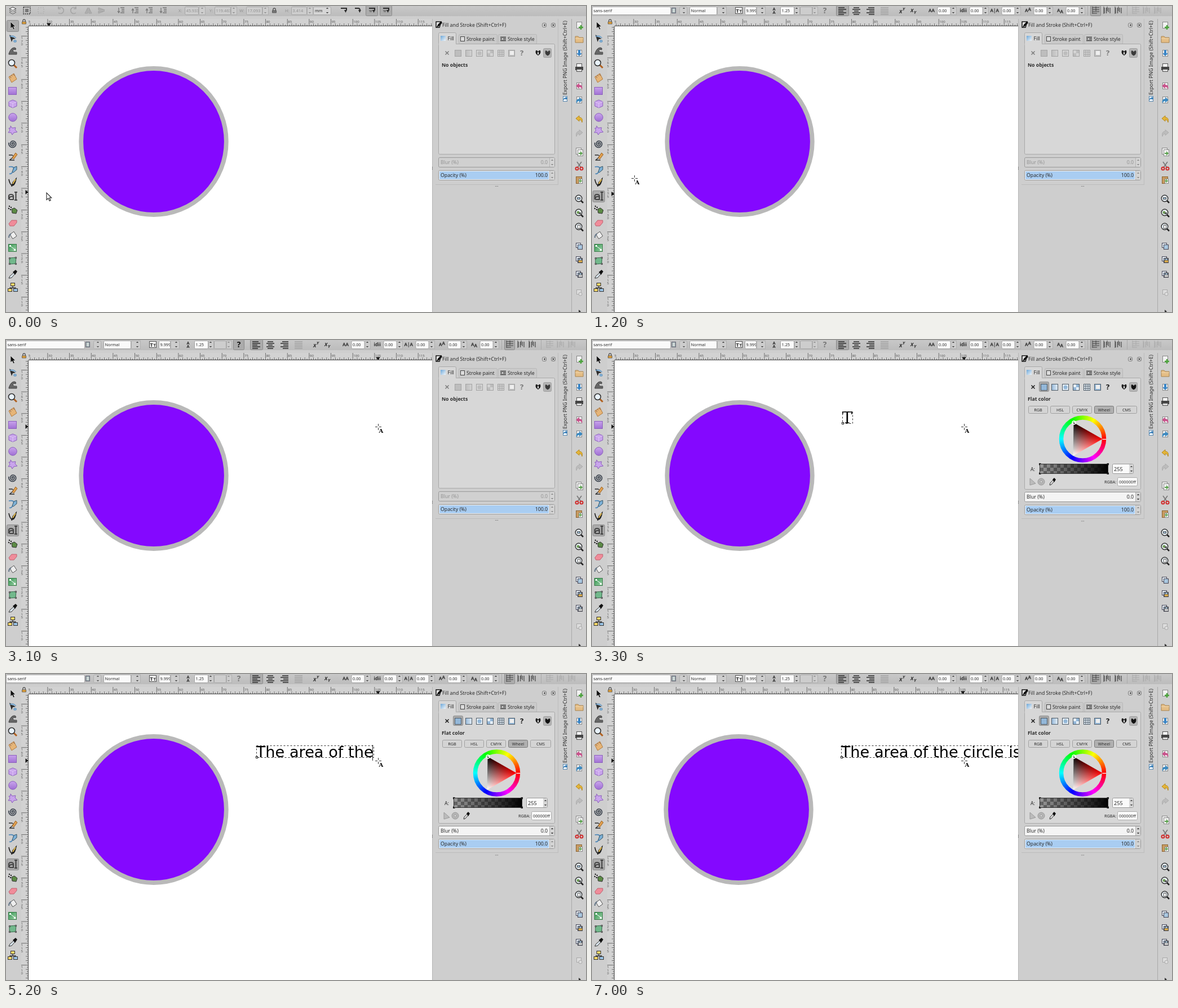
An HTML page with a canvas for the animation above (8 s loop, 1029x544 px).

```html
<!DOCTYPE html>
<html lang="en">
<head>
<meta charset="utf-8">
<title>Typing text beside a circle</title>
<style>
html, body { margin: 0; width: 100%; height: 100%; overflow: hidden; background: #cecece; }
canvas { display: block; }
</style>
</head>
<body>
<canvas id="stage" width="1029" height="544"></canvas>
<script>
const c = document.getElementById('stage').getContext('2d');
const LOOP = 8000, BG = '#cecece', INK = '#2b2b2b', FADED = '#a3a3a3';
const UI = '"Noto Sans", sans-serif', UNIT = 7.733;
const SENTENCE = 'The area of the circle is';

// [time, characters typed]
const TYPED = [[0, 0], [3300, 1], [3500, 2], [3600, 3], [3700, 4], [3800, 5], [3900, 6], [4000, 7], [4100, 8],
  [4300, 9], [4700, 10], [4800, 11], [4900, 12], [5100, 14], [5200, 15], [5400, 16], [5700, 18], [5800, 19],
  [6200, 20], [6300, 21], [6400, 22], [6600, 23], [7000, 25]];
// [time, x, y]
const POINTER = [[0, 72, 332], [500, 10, 334], [1100, 10, 334], [1200, 75, 306], [1600, 444, 145], [1700, 444, 145],
  [1900, 444, 148], [2200, 444, 148], [2300, 575, 152], [2400, 660, 154], [LOOP, 660, 154]];

function pointerAt(t) {
  t = Math.floor(t / 100) * 100;
  const i = Math.max(1, POINTER.findIndex(p => p[0] >= t));
  const [t0, x0, y0] = POINTER[i - 1], [t1, x1, y1] = POINTER[i];
  const k = (t - t0) / (t1 - t0);
  return [x0 + (x1 - x0) * k, y0 + (y1 - y0) * k];
}

function rect(x, y, w, h, fill, stroke) {
  if (fill) { c.fillStyle = fill; c.fillRect(x, y, w, h); }
  if (stroke) { c.lineWidth = 1; c.strokeStyle = stroke; c.strokeRect(x + .5, y + .5, w - 1, h - 1); }
}
function box(x, y, w, h, fill, stroke) {
  c.beginPath(); c.roundRect(x + .5, y + .5, w - 1, h - 1, 2);
  c.fillStyle = fill; c.fill();
  c.lineWidth = 1; c.strokeStyle = stroke; c.stroke();
}
function text(s, x, y, { size = 8.75, color = INK, align = 'left', weight = 400, family = UI } = {}) {
  c.font = `${weight} ${size}px ${family}`;
  c.textAlign = align; c.fillStyle = color; c.fillText(s, x, y);
}
function icon(x, y, d, fill, stroke, width = 1) {
  c.save(); c.translate(x, y);
  const p = new Path2D(d);
  if (fill) { c.fillStyle = fill; c.fill(p); }
  if (stroke) { c.lineWidth = width; c.strokeStyle = stroke; c.stroke(p); }
  c.restore();
}
function disc(x, y, r, fill, stroke, width = 1) {
  c.beginPath(); c.arc(x, y, r, 0, 7);
  if (fill) { c.fillStyle = fill; c.fill(); }
  if (stroke) { c.lineWidth = width; c.strokeStyle = stroke; c.stroke(); }
}
function gradient(x0, y0, x1, y1, ...colors) {
  const g = c.createLinearGradient(x0, y0, x1, y1);
  colors.forEach((color, i) => g.addColorStop(i / (colors.length - 1), color));
  return g;
}
const spinner = (x, y, color = '#555') => icon(x, y, 'M-2.2-3 0-5.2 2.2-3ZM-2.2 3 0 5.2 2.2 3Z', color);
const small = (s, x, y, more) => text(s, x, y, { size: 7.3, ...more });
const pressed = (x, y, w, h) => box(x, y, w, h, '#ababab', '#8a8a8a');

function entry(label, x, w, off, spinX) {
  box(x, 1, w, 15, off ? '#cdcdcd' : '#fafafa', '#a5a5a5');
  c.save();
  c.beginPath(); c.rect(x, 0, w - 1, 17); c.clip();
  small(label, x + 2.5, 11, { color: off ? '#909090' : INK });
  c.restore();
  if (spinX) { rect(x + w, 1, spinX - x - w + 6, 15, '#cdcdcd', '#b0b0b0'); spinner(spinX, 8, off ? '#909090' : '#444'); }
}

function selectBar() {
  icon(12, 8, 'M-6-3 0-6 6-3 0 0ZM-6 0 0 3 6 0M-6 3 0 6 6 3', '#eee', '#444');
  c.setLineDash([2, 1.5]); icon(37, 8, 'M-6-6H6V6H-6Z', null, INK, 1.3); c.setLineDash([]);
  icon(37, 8, 'M-3-3H3V3H-3Z', '#777');
  c.setLineDash([2, 2]); icon(62, 8, 'M-5-5H5V5H-5Z', null, '#aaa'); c.setLineDash([]);
  icon(97, 8, 'M-4-4A5.5 5.5 0 1 1-4 4M-4-7V-3H0', null, '#a5a5a5', 1.7);
  icon(120, 8, 'M4-4A5.5 5.5 0 1 0 4 4M4-7V-3H0', null, '#a5a5a5', 1.7);
  icon(146, 8, 'M-6 5-1-5V5ZM6 5 1-5V5Z', '#b0b0b0', '#a0a0a0');
  icon(170, 8, 'M-6-5 5-1H-6ZM-6 5 5 1H-6Z', '#b0b0b0', '#a0a0a0');
  [204, 229, 254, 279].forEach((x, i) => {
    icon(x, 8, 'M-1-5H6M1-2H6M1 1H6M-1 4H6', null, '#777', 1.5);
    icon(x, 8, i % 3 ? 'M-4 5V-2M-6 0-4-3-2 0' : 'M-4-5V3M-6 1-4 4-2 1', null, '#777', 1.3);
  });
  [['X:', 306, 317, 25, '45.933', 348], ['Y:', 361, 370, 29, '119.463', 404], ['W:', 414, 426, 29, '17.093', 460],
    ['H:', 495, 506, 28, '3.414', 539]].forEach(([label, x, left, w, value, spin]) => {
    small(label, x, 11, { color: '#909090' });
    entry(value, left, w, true, spin);
  });
  padlock(476, 8, '#777');
  box(545, 1, 32, 15, '#d6d6d6', '#aaa'); small('mm', 548, 11); spinner(570, 8, '#444');
  pressed(638, -2, 22, 20); pressed(663, -2, 22, 20);
  [599, 624, 649, 674].forEach((x, i) => {
    icon(x, 6, i === 1 ? 'M-5-2H1Q4-2 4 2' : 'M-5-2H5V2', null, INK, 2);
    icon(x, 9, 'M1-2H6L3.5 3Z', INK);
    if (i > 1) icon(x, 7, 'M-5 1H2M-4 3H0', null, '#555');
  });
}

function textBar(helpHover) {
  entry('sans-serif', 0, 140);
  rect(141, 3, 8, 10, '#9aa', '#667'); icon(145, 8, 'M-2-2H2M-2 0H2M-2 2H2', null, '#fff');
  box(155, 1, 14, 15, '#cdcdcd', '#b0b0b0'); spinner(163, 8);
  entry('Normal', 173, 49, false, 233);
  rect(254, 2, 13, 12, '#f0f0f0', '#555');
  text('T', 255.5, 12, { size: 9, weight: 800 }); small('T', 261.5, 12, { weight: 800 });
  entry('9.999', 271, 21, false, 302);
  for (const y of [7.5, 14]) small('A', 323, y, { weight: 800, align: 'center' });
  entry('1.25', 334, 25, false, 363);
  entry('', 369, 22, true, 395);
  if (helpHover) pressed(403, -2, 20, 20);
  text('?', 413, 13, { size: 14, weight: 800, align: 'center', color: helpHover ? '#111' : '#777' });
  pressed(433, -2, 23, 20);
  ['M-7-5H4M-7-2H7M-7 1H2M-7 4H7M-7 7H3', 'M-5-5H5M-7-2H7M-4 1H4M-7 4H7M-5 7H5', 'M-4-5H7M-7-2H7M-2 1H7M-7 4H7M-3 7H7',
    'M-7-5H7M-7-2H7M-7 1H7M-7 4H7M-7 7H7'].forEach((d, i) => icon(444 + i * 25, 8, d, null, i === 3 ? FADED : INK, 1.5));
  const script = { weight: 'italic 800' };
  text('X', 545, 13, script); small('Y', 551, 8, script);
  text('X', 565, 11, script); small('Y', 571, 14, script);
  ['AA', 'idii', 'A|A', 'AA', 'AA'].forEach((label, i) => {
    const x = 613 + i * 57, last = label.slice(-1), raise = [0, 0, 0, -2, 2][i];
    text(last, x - 5, 11 + raise, { weight: 800, size: 8, align: 'right' });
    const lastWidth = c.measureText(last).width;
    text(label.slice(0, -1), x - 5 - lastWidth, 11, { weight: 800, size: 8, align: 'right' });
    entry('0.00', x - .5, 24, false, x + 28);
  });
  rect(879, 0, 1, 17, '#aaa'); rect(949, 0, 1, 17, '#aaa');
  pressed(884, -2, 19, 20);
  [894, 914, 934, 965, 984, 1004].forEach((x, i) => {
    const color = i < 3 ? '#444' : '#aaa';
    icon(x, 8, i % 3 ? 'M-5-5V5M-1.5-5V5M2-5V3M5-5V5' : 'M-6-5H6M-6-1.5H6M-6 2H6M-6 5H2', null, color, 1.2);
    icon(x, 8, 'M-6-7V6M0-7V1', null, color);
  });
}

function padlock(x, y, color) {
  icon(x, y, 'M-2.2 0V-2A2.2 2.2 0 0 1 2.2-2V0', null, '#444', 1.2);
  icon(x, y, 'M-3.5 0H3.5V4H-3.5Z', color, '#444', .7);
}

function toolbox(textTool, hover) {
  if (hover) box(1, 328, 22, 21, '#bdbdbd', '#a0a0a0');
  pressed(1, textTool ? 328 : 25, 22, 21);
  const purple = y => gradient(0, y - 7, 0, y + 7, '#c9a4ec', '#a070d4');
  const edge = '#8b5fbd', blue = '#4b86b8';
  icon(8, 28, 'M0 0V12L3 9.5 5 14 7.3 13 5.3 8.7H9Z', '#111', '#eee', .7);
  icon(12, 57, 'M-6-6 5 1 0 2-2 7Z', INK); icon(12, 57, 'M-6-3Q2-6 6 0M2 4H6V7H2Z', '#9cc4e4', blue);
  icon(12, 80, 'M-7 5Q-4-5 2-6Q7-6 5-2Q1-4 0 0Q2 3 7 2V6H-7Z', '#666', '#444');
  icon(12, 103, 'M2 2 7 7', null, '#b06020', 3); disc(10, 101, 5.5, '#e8f2fa', INK, 1.5);
  icon(12, 128, 'M-7-2 2-8 7 2-2 8Z', '#e6b578', '#b27a3c'); icon(12, 128, 'M-5-3-3 0M-2-5-1-3M1-7 3-4', null, '#865');
  rect(4, 144, 15, 14, purple(151), edge);
  icon(12, 174, 'M-7-4 0-7 7-4V4L0 7-7 4Z', purple(174), edge); icon(12, 174, 'M-7-4 0-1 7-4M0-1V7', null, '#e0c8f5');
  disc(12, 198, 7.3, purple(198), edge);
  icon(12, 221, 'M-4-8-1-4 5-5 4-1 8 3 2 4-1 8-3 4-8 4-5 0-7-4-4-4Z', purple(221), edge);
  c.beginPath();
  for (let a = 0; a < 16; a += .2) c.lineTo(12 + a * .45 * Math.cos(a), 245 + a * .45 * Math.sin(a));
  c.strokeStyle = '#444b55'; c.lineWidth = 1.8; c.stroke();
  icon(12, 268, 'M-7-3H-1Q3-1-2 3T-5 6H3', null, INK, 1.3); icon(12, 268, 'M-1 2 5-7 8-4 2 4Z', '#e0a050', '#9a6020');
  icon(12, 291, 'M-7-5Q4-7 1 1T-6 7', null, blue, 1.7); icon(12, 291, 'M-1 4 2-4 7-6 7 0 1 5Z', '#7db1d8', '#356');
  icon(12, 314, 'M-7-6Q-5 5 0 5Q4 4 6-7L0 0-2 7', '#222', '#222', 1.6); icon(12, 314, 'M0 2 5-6', null, '#e5bc50', 2);
  icon(12, 338, 'M3-7H8M5.5-7V7M3 7H8M-7 6V0Q-7-3-3-3T1 0V6H-4Q-7 6-6 3T1 1', null, '#444', 2.1);
  icon(12, 362, 'M-2-1 3-3 8 1 6 7-1 6Z', '#5b8a45', '#333');
  [[6, 356], [9, 358], [5, 360], [8, 362]].forEach(([x, y]) => disc(x, y, 1.2, '#222'));
  icon(12, 385, 'M-7 2-2-4H7V0L2 6H-5Z', '#f08c9a', '#c0606e');
  icon(12, 407, 'M-5-1 2-6 7 2 0 7Z', '#eee', '#555'); icon(12, 407, 'M-7 5Q-7 0-3-2', null, '#678', 2);
  rect(4, 423, 15, 14, gradient(4, 423, 19, 437, '#2c9148', '#a5d6b0'), '#397a48');
  icon(12, 430, 'M-4-3 4 3', null, '#fff'); rect(6, 425, 3, 3, '#fff'); rect(14, 432, 3, 3, '#fff');
  icon(12, 453, 'M-6-5 6-6 5 5-6 6Z', '#72b88c', '#356b4a');
  [[5, 447], [16, 446], [5, 457], [16, 457]].forEach(([x, y]) => rect(x, y, 3, 3, '#eee', '#444'));
  icon(12, 477, 'M-7 7-5 3 2-3 4-1-2 6Z', '#dce7ef', '#333'); icon(12, 477, 'M0-4 5-8 8-5 4 1Z', '#111');
  icon(12, 500, 'M0-4V1M-5 4V1H5V4', null, '#333', 1.3);
  rect(8, 492, 8, 6, '#f4d768', '#333'); rect(3, 502, 8, 6, '#f4d768', '#333'); rect(13, 502, 8, 6, '#9bc4e6', '#333');
}

function rulers(shift, [mx, my]) {
  const label = { size: 6, color: '#555' };
  rect(27, 23, 729, 13, '#d2d2d2'); rect(27, 36, 13, 508, '#d2d2d2');
  c.save();
  c.beginPath(); c.rect(40, 23, 716, 13); c.rect(27, 36, 13, 508); c.clip();
  for (let i = 0; i < 190; i++) {
    const x = 73.5 + shift + (i / 2 - 5) * UNIT;
    const major = i % 10 === 0, len = major ? 13 : i % 2 ? 3 : 5;
    rect(x, 36 - len, .8, len, '#555');
    if (major) text(25 + i / 2, x + 1.5, 29.5, label);
  }
  for (let i = 0; i < 150; i++) {
    const y = 517 - (i / 2 - 5) * UNIT;
    const major = i % 10 === 0, len = major ? 13 : i % 2 ? 3 : 5;
    rect(40 - len, y, len, .8, '#555');
    if (major) [...String(105 + i / 2)].forEach((d, k) => text(d, 26.5, y + 6 + k * 5.5, label));
  }
  icon(mx + shift, 33, 'M-4-2.5H4L0 2.5Z', '#111');
  icon(37, my, 'M-2.5-4V4L2.5 0Z', '#111');
  c.restore();
  rect(40, 35, 716, 1, '#444'); rect(39, 36, 1, 508, '#444');
  padlock(32, 28, '#e2a13a');
}

function colorWheel(x, y) {
  const ring = c.createConicGradient(0, x, y);
  ['#f00', '#f0f', '#00f', '#0ff', '#0f0', '#ff0', '#f00'].forEach((color, i) => ring.addColorStop(i / 6, color));
  disc(x, y, 38, null, ring, 7.5);
  const triangle = 'M35 0L-16-29L-17 30Z';
  icon(x, y, triangle, '#000');
  c.globalCompositeOperation = 'lighter';
  icon(x, y, triangle, gradient(-16.5, 0, 35, 0, '#000', '#f00'));
  icon(x, y, triangle, gradient(8.5, -14.5, -17, 30, '#000', '#fff'));
  c.globalCompositeOperation = 'source-over';
  icon(x, y, 'M35 .5H42', null, '#fff', 1.3);
  disc(x - 15.5, y - 29, 3, null, '#fff', 1.3);
}

function fillControls() {
  ['RGB', 'HSL', 'CMYK', 'Wheel', 'CMS'].forEach((name, i) => {
    const x = 774 + i * 39, on = name === 'Wheel', w = i === 4 ? 37 : 35;
    box(x, 117, w, 14, on ? '#b0b0b0' : '#d4d4d4', on ? '#777' : '#a0a0a0');
    small(name, x + w / 2, 127, { align: 'center' });
  });
  colorWheel(870.5, 176);
  text('A:', 778, 233);
  for (let i = 0; i < 20; i++) for (let j = 0; j < 3; j++)
    rect(795 + i * 6, 221 + j * 6, 6, j === 2 ? 5 : 6, (i + j) % 2 ? '#666' : '#999');
  rect(794, 220, 122, 18, gradient(794, 0, 916, 0, 'rgba(0,0,0,0)', '#000'), '#333');
  icon(794, 220, 'M-1-1H3L-1 3ZM123-1H119L123 3ZM-1 19H3L-1 15ZM123 19H119L123 15Z', '#222');
  box(923, 220, 38, 18, '#fafafa', '#999'); rect(953, 221, 7, 16, '#d6d6d6');
  text('255', 926, 233, { size: 9.2 }); spinner(957, 229, '#444');
  icon(781, 252, 'M-4-6 6 3-4 6Z', '#bbb', '#999');
  disc(797, 252, 6, '#b5b5b5', '#999'); disc(797, 252, 2, '#ddd', '#999');
  icon(817, 252, 'M-5 6-4 2 1-3 3-1-2 5Z', '#ddd', '#333'); icon(817, 252, 'M0-4 3-7 6-4 3 1Z', '#111');
  small('RGBA:', 909, 255); box(932, 244, 36, 16, '#fafafa', '#aaa'); small('000000ff', 935, 255);
}

function sliderRow(label, value, y, on, selected) {
  box(767, y, 207, 18, on ? '#f4f4f4' : '#d0d0d0', '#999');
  if (selected) rect(769, y + 2, 194, 14, '#a9cdf2');
  rect(964, y + 1, 9, 16, '#d4d4d4'); rect(964, y + 1, 1, 16, '#b4b4b4');
  const color = on ? INK : '#949494';
  text(label, 771, y + 12.3, { color }); text(value, 961, y + 12.3, { color, align: 'right' });
  spinner(969, y + 9, on && !selected ? '#333' : '#888');
}

function panel(active) {
  rect(756, 18, 273, 526, BG); rect(756, 23, 1, 521, '#b5b5b5');
  rect(762, 317, 217, 1, '#bcbcbc'); rect(979, 23, 1, 295, '#bcbcbc');
  icon(768, 33, 'M-5-5H4L1 5H-5Z', '#f4f4f4', '#111', 1.5); icon(768, 33, 'M-4 5-2 0 4-6 6-3 0 3Z', '#111');
  text('Fill and Stroke (Shift+Ctrl+F)', 774, 36.7);
  [955, 971].forEach(x => box(x - 4, 30, 8, 8, '#d6d6d6', '#777'));
  icon(955, 34, 'M-1.5 0 1.5-2V2Z', '#333'); icon(971, 34, 'M-2-2 2 2M2-2-2 2', null, '#333');

  const bottom = active ? 266 : 264;
  box(803, 50, 69, 18, '#cacaca', '#b8b8b8'); box(873, 50, 69, 18, '#cacaca', '#b8b8b8');
  box(767, 67, 207, bottom - 67, '#d7d7d7', '#a8a8a8');
  box(767, 47, 32, 22, '#d7d7d7', '#a8a8a8'); rect(768, 66, 30, 4, '#d7d7d7');
  rect(771, 53, 9, 9, gradient(771, 53, 780, 62, '#6fa8d8', '#eef5fb'));
  text('Fill', 783.5, 60.7);
  rect(806, 54, 8, 9, '#ddd', '#444'); text('Stroke paint', 817, 61.7);
  icon(882, 58.5, 'M-5-3H5M-5 0H-2M0 0H5M-5 3H5', null, '#333', 1.4); text('Stroke style', 890, 61.7);

  const edge = active ? '#4d5a66' : FADED, ink = active ? '#111' : '#777';
  icon(782.5, 83.5, 'M-3-3 3 3M3-3-3 3', null, ink, 1.4);
  if (active) pressed(793, 74, 18, 18);
  const flat = active ? '#93b7d8' : '#bdbdbd', pale = active ? '#e6eff7' : '#d3d3d3';
  [802, 821, 840, 859, 878, 897].forEach((x, i) => {
    rect(x - 6, 78, 12, 12, [flat, gradient(x - 6, 0, x + 6, 0, flat, pale), pale, pale, pale, flat][i], edge);
    if (i === 2) disc(x, 84, 3.5, flat);
    if (i === 3) { rect(x, 79, 5, 5, flat); rect(x - 5, 84, 5, 5, flat); }
    if (i === 4) icon(x, 84, 'M-5-2H5M-5 2H5M-2-5V5M2-5V5', null, edge);
    if (i === 5) rect(x - 3, 80, 7, 7, '#eee');
  });
  text('?', 915, 88, { size: 13, weight: 800, align: 'center', color: ink });
  box(953, 75, 15, 17, '#b4b4b4', '#a0a0a0');
  const shield = 'M-4-4Q-2-5 0-2Q2-5 4-4Q6 2 0 5Q-6 2-4-4Z';
  icon(944, 83, shield, '#222'); icon(944, 83, 'M-1-1H1V3H-1Z', '#e4e4e4'); icon(961, 83.5, shield, active ? '#111' : '#3a3a3a');
  text(active ? 'Flat color' : 'No objects', 773, 107.7, { weight: 700 });
  if (active) fillControls();

  const drop = active ? 1.5 : 0;
  sliderRow('Blur (%)', '0.0', 269 + Math.floor(drop), active, false);
  sliderRow('Opacity (%)', '100.0', 292 + Math.floor(drop), true, true);
  for (const x of [868, 870, 872]) rect(x, 320 + drop, 1, 1, '#666');
  for (const y of [286, 288, 290]) rect(756, y, 1, 1, '#555');

  c.save(); c.translate(995, 158); c.rotate(-Math.PI / 2);
  text('Export PNG Image (Shift+Ctrl+E)', 0, 0); c.restore();
  rect(988, 160, 8, 10, '#eef5fb', '#5a87ad'); icon(991, 164, 'M-2 3Q-2-1 2-1V-3L5 0 2 3V1Q0 1-2 3Z', '#2e78b5');
}

function commandBar() {
  rect(1003, 23, 1, 521, '#a9a9a9');
  const page = (x, y) => rect(x - 5, y - 6, 10, 12, '#f2f2f2', '#888');
  const x = 1017;
  page(x, 34); icon(x + 3, 38, 'M-4 0H4M0-4V4', null, '#4ca63c', 2.5);
  icon(x, 59, 'M-7-5H-2L0-3H7V6H-7Z', '#e4bd85', '#a8834e'); icon(x, 59, 'M-7-1H7', null, '#f3dab2');
  page(x, 84); icon(x, 84, 'M-2-6H2V0H5L0 5-5 0H-2Z', '#3b86c6');
  rect(x - 5, 102, 10, 7, '#f5f5f5', '#555'); rect(x - 7, 108, 14, 6, '#444'); rect(x - 5, 112, 10, 5, '#ddd', '#555');
  const arrow = 'M-6-1 0-6V-3Q7-3 5 6Q4 1 0 1V4Z', mirrored = 'M6-1 0-6V-3Q-7-3-5 6Q-4 1 0 1V4Z';
  page(x, 142); icon(x, 143, arrow, '#c8548c');
  page(x, 167); icon(x, 168, mirrored, '#3d8ac0');
  icon(x, 201, arrow, '#e5b638', '#b78a20'); icon(x, 226, mirrored, '#bdbdbd', '#adadad');
  page(x - 1, 258); page(x + 2, 261); icon(x + 2, 261, 'M-3 0H0V-3L4 1 0 5V2H-3Z', '#57a04a');
  icon(x, 284, 'M-4-7 3 3M4-7-3 3', null, '#777', 1.6);
  for (const dx of [-4, 4]) disc(x + dx, 289, 2.5, null, '#d02b2b', 2);
  rect(x - 6, 303, 11, 13, '#c79a60', '#8b6535'); rect(x - 1, 307, 7, 9, '#f2f2f2', '#888'); icon(x + 2, 311, 'M-3 0H3M0-3V3', null, '#57a04a', 1.5);
  [343, 368, 393].forEach((y, i) => {
    icon(x, y, 'M3 3 7 7', null, '#222', 2.5); disc(x - 1, y - 1, 5.8, '#e5ecf1', '#333', 1.4);
    if (i === 0) rect(x - 4, y - 3, 6, 4, '#9abcd6', '#555');
    if (i === 1) { disc(x - 2, y - 1, 2.5, '#6f9e55'); rect(x - 1, y - 1, 4, 3, '#555'); }
    if (i === 2) rect(x - 3, y - 4, 5, 7, '#fff', '#555');
  });
  [427, 451, 477].forEach((y, i) => {
    rect(x - 6, y - 6, 9, 9, '#e6eef5', '#445'); rect(x - 3, y - 3, 9, 9, '#a9c7df', '#445');
    if (i) padlock(x + 2, y + 1, i === 1 ? '#e2b04b' : '#d8d8d8');
  });
  rect(x - 5, 504, 9, 9, '#ddd', '#aaa'); disc(x + 2, 512, 3, '#ddd', '#aaa');
  icon(x + 1, 542, 'M-2-2 2 1-2 4Z', '#333');
}

function drawing(t, shift) {
  c.save();
  c.beginPath(); c.rect(40, 36, 716, 508); c.clip();
  rect(40, 36, 716, 508, '#fff');
  c.translate(shift, 0);
  c.beginPath(); c.ellipse(262, 241, 128.8, 130, 0, 0, 7);
  c.fillStyle = '#8408ff'; c.fill(); c.lineWidth = 7.8; c.strokeStyle = '#b9b9b9'; c.stroke();

  if (t >= 2100 && t < 3100) rect(443.5, 121, 1, 27, '#222');
  const count = TYPED.findLast(([time]) => time <= t)[1];
  if (count) {
    const typed = SENTENCE.slice(0, count), firstGlyph = t < 3400;
    const family = firstGlyph ? '"DejaVu Serif", serif' : '"DejaVu Sans", sans-serif';
    text(typed, 443.7, 148, { size: 27.2, color: '#000', family });
    const right = Math.round(444 + c.measureText(typed.trim()).width);
    c.setLineDash([3, 3]); rect(444, 127, right - 444 + 1, 22, null, '#333'); c.setLineDash([]);
    rect(443, 146, 4, 4, '#fff', '#111');
    if (!firstGlyph) rect(Math.round(443.5 + c.measureText(typed).width) - 1, 126, 1, 28, '#222');
  }
  c.restore();
}

function pointer([x, y], crosshair) {
  if (crosshair) {
    icon(Math.round(x), Math.round(y), 'M-5 .5H-1M2 .5H6M.5-5V-1M.5 2V6', null, '#333');
    text('A', x + 5.5, y + 10.8, { size: 10, weight: 700, align: 'center', color: '#000', family: '"DejaVu Serif", serif' });
  } else {
    icon(x, y, 'M0 0V12.5L3 9.8 5.2 14.5 7.2 13.6 5 9H8.7Z', '#fff', '#222', 1.1);
  }
}

function frame(t) {
  const textMode = t >= 1100, shift = t >= 7000 ? -2 : 0;
  const at = pointerAt(t);
  const marker = t < 1100 ? [at[0] + 4, at[1] - 1] : t < 1300 ? [14, 334] : at;
  rect(0, 0, 1029, 544, BG);
  drawing(t, shift);
  rulers(shift, marker);
  panel(t >= 3300);
  commandBar();
  rect(0, 0, 1029, 18, gradient(0, 0, 0, 18, '#c8c8c8', '#bcbcbc'));
  if (textMode) textBar(t >= 2100 && t < 3300); else selectBar();
  toolbox(textMode, t >= 400 && !textMode);
  pointer(at, t >= 1200);
}

const start = performance.now();
function tick() {
  frame((performance.now() - start) % LOOP);
  requestAnimationFrame(tick);
}
tick();
</script>
</body>
</html>
```
